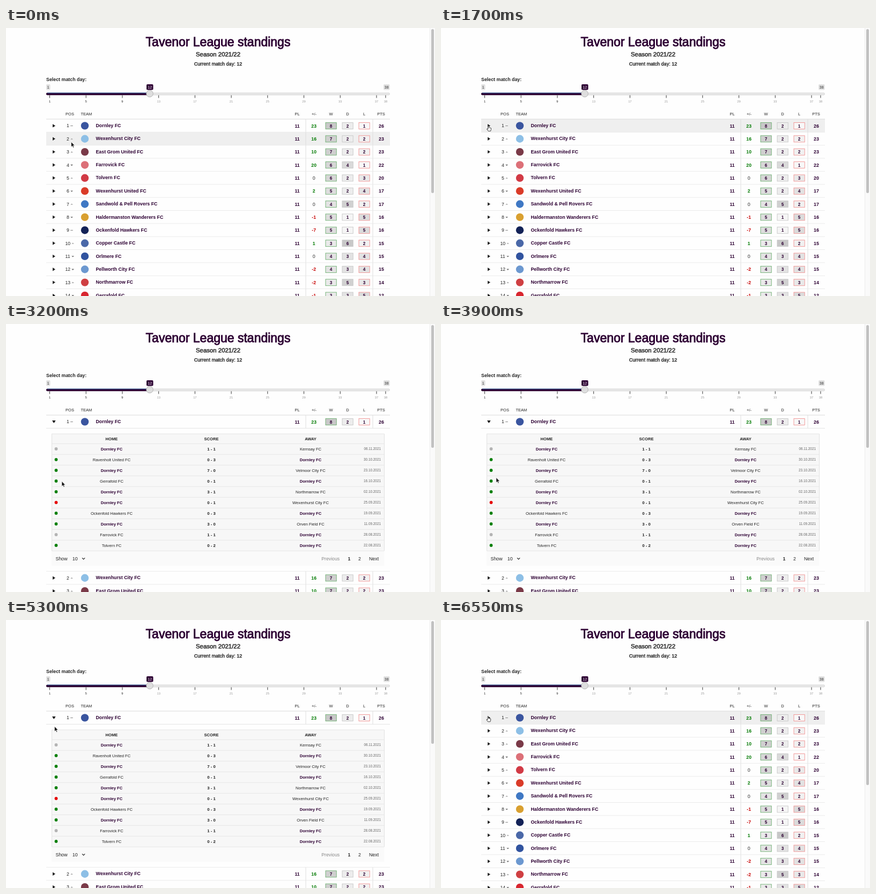
These frames come from a looping animation (800 by 500 pixels, 6600 ms). An HTML page:

```html
<!DOCTYPE html>
<html lang="en">
<head>
<meta charset="utf-8">
<title>League standings</title>
<style>
  html, body { margin: 0; width: 100%; height: 100%; overflow: hidden; background: #fefefe; }
  svg { display: block; font-family: "Liberation Sans", Arial, sans-serif; }
</style>
</head>
<body>
<svg id="stage" width="800" height="500" viewBox="0 0 800 500"></svg>
<script>
const INK = '#2d0033', DARK = '#222', LOOP = 6600, ROW = 24.35, TOP = 170, SHIFT = 267;
const OPEN_AT = 1950, CLOSE_AT = 5700;

// name, crest colour, trend, goal difference, won, drawn, lost
const teams = [
  ['Dornley FC', '#3a559f', 0, 23, 8, 2, 1],
  ['Wexenhurst City FC', '#8dbfe6', 1, 16, 7, 2, 2],
  ['East Grom United FC', '#7a3a48', 1, 10, 7, 2, 2],
  ['Farrovick FC', '#dc7078', -1, 20, 6, 4, 1],
  ['Tolvern FC', '#d23a45', 1, 0, 6, 2, 3],
  ['Wexenhurst United FC', '#da3b28', -1, 2, 5, 2, 4],
  ['Sandwold & Pell Rovers FC', '#3f78c4', 1, 0, 4, 5, 2],
  ['Haldermanston Wanderers FC', '#d9a030', -1, -1, 5, 1, 5],
  ['Ockenfold Hawkers FC', '#132257', 0, -7, 5, 1, 5],
  ['Copper Castle FC', '#4a68a8', 1, 1, 3, 6, 2],
  ['Orlmere FC', '#31539f', -1, 0, 4, 3, 4],
  ['Pellworth City FC', '#6c98d0', -1, -2, 4, 3, 4],
  ['Northmarrow FC', '#cf3f42', 1, -2, 3, 5, 3],
  ['Gerrafold FC', '#d8262f', -1, -1, 3, 3, 5]
];
// opponent, at home, score, date
const matches = [
  ['Kernsay FC', 1, '1 - 1', '06.11'],
  ['Ravenholt United FC', 0, '0 - 3', '30.10'],
  ['Velmoor City FC', 1, '7 - 0', '23.10'],
  ['Gerrafold FC', 0, '0 - 1', '16.10'],
  ['Northmarrow FC', 1, '3 - 1', '02.10'],
  ['Wexenhurst City FC', 1, '0 - 1', '25.09'],
  ['Ockenfold Hawkers FC', 0, '0 - 3', '19.09'],
  ['Orven Field FC', 1, '3 - 0', '11.09'],
  ['Farrovick FC', 0, '1 - 1', '28.08'],
  ['Tolvern FC', 0, '0 - 2', '22.08']
];

const rect = (x, y, w, h, fill, extra = '') =>
  `<rect x="${x}" y="${y}" width="${w}" height="${h}" fill="${fill}" ${extra}/>`;
const circle = (x, y, r, fill, extra = '') =>
  `<circle cx="${x}" cy="${y}" r="${r}" fill="${fill}" ${extra}/>`;
const path = (d, fill, extra = '') => `<path d="${d}" fill="${fill}" ${extra}/>`;

// y is the middle of the capitals; weight: 0 regular, 1 medium, 2 bold
function text(s, x, y, size, { fill = DARK, weight = 0, anchor = 'middle' } = {}) {
  const heavy = weight === 2 ? 'font-weight="700"'
    : weight === 1 ? `stroke="${fill}" stroke-width="${size * .04}"` : '';
  return `<text x="${x}" y="${y + size * .36}" font-size="${size}" fill="${fill}" text-anchor="${anchor}" ${heavy}>${s.toString().replace('&', '&amp;')}</text>`;
}

function header() {
  let s = text('Tavenor League standings', 395.5, 25.5, 23, { fill: INK, weight: 1 })
    + text('Season 2021/22', 395.5, 49.3, 11.4, { weight: 1 })
    + text('Current match day: 12', 395.5, 66.5, 9.05, { weight: 1 })
    + text('Select match day:', 75, 96, 8.85, { weight: 2, anchor: 'start' });
  const tag = (label, x, w, bg, fill) =>
    rect(x, 105, w, 10.5, bg, 'rx="1.8"') + text(label, x + w / 2, 110.2, 7, { fill });
  s += tag(1, 75, 7.5, '#e1e1e1', '#333') + tag(38, 704, 11.5, '#e1e1e1', '#333')
    + tag(12, 262, 12.5, INK, '#fff');
  s += rect(75.5, 121, 640, 4, '#e8e8e8', 'rx="2" stroke="#ccc" stroke-width=".7"')
    + rect(75, 120.8, 193, 4.5, '#2b0030', 'rx="2"')
    + rect(77, 120.7, 190, .8, '#428bca');
  for (const n of [1, 5, 9, 13, 17, 21, 25, 29, 33, 37, 38]) {
    const x = 81.5 + (n - 1) * 16.93;
    s += rect(x - .5, 125.5, 1, 5, '#333')
      + text(n, x, 136.5, 5.8, { fill: n < 13 ? DARK : '#999' });
  }
  s += circle(268, 122.5, 6.3, '#dedede', 'stroke="#aaa" stroke-width=".8"');
  const heads = { POS: 119, PL: 543, '+/-': 574.5, W: 606, D: 637, L: 668, PTS: 699.5 };
  for (const h in heads) s += text(h, heads[h], 160.5, 7.5);
  return s + text('TEAM', 139.5, 160.5, 7.5, { anchor: 'start' });
}

function teamRow([name, crest, trend, diff, ...wdl], i) {
  const top = TOP + ROW * i, y = top + 12.4, rank = i + 1, wide = rank > 9 ? 2.4 : 0;
  const bold = { fill: INK, weight: 2 };
  let s = rect(75, top - .5, 641, 1, i ? '#ebebeb' : '#dcdcdc')
    + rect(558.5, top, 1, ROW, '#dedede') + rect(683.5, top, 1, ROW, '#dedede');
  if (i) s += path(`M87 ${y - 3.2}l5 3.2l-5 3.2z`, DARK);
  s += text(rank, 113 - wide, y, 8.6, { anchor: 'start' });
  const m = 122.6 + wide * .85;
  s += trend ? path(`M${m - 2.3} ${y + trend + .3}h4.6l-2.3 ${-2.4 * trend}z`, trend > 0 ? '#aaa' : '#666')
    : rect(m - 2.4, y - .3, 4.6, .9, '#777');
  s += circle(147, y, 7.2, crest)
    + text(name, 167.5, y - .5, 8.8, { ...bold, anchor: 'start' })
    + text(11, 543, y, 8.7, bold)
    + text(diff, 574.2, y, 8.7, { weight: diff ? 2 : 1, fill: diff > 0 ? '#007a00' : diff ? '#c80000' : '#666' })
    + text(3 * wdl[0] + wdl[1], 700, y, 8.8, bold);
  wdl.forEach((n, k) => {
    const g = Math.round(255 - n * [6.9, 9.2, 7.2][k]), x = 606 + 31 * k;
    s += rect(x - 10, y - 5.9, 20.2, 12, `rgb(${g},${g},${g})`,
      `stroke="${['#6aae6e', '#c6c6c6', '#f29090'][k]}" stroke-width=".9"`)
      + text(n, x, y + .2, 8.2, bold);
  });
  return s;
}

function detail() {
  const line = y => rect(85, y, 620.5, 1, '#e6e6e6');
  let s = rect(75, 194, 641, 1, '#e4e4e4') + rect(85, 205, 620.5, 246, '#fafafa')
    + rect(85, 205, 620.5, 218, '#f7f7f7') + line(204.5) + line(222.8)
    + rect(85, 205, 1, 218, '#e2e2e2') + rect(705, 205, 1, 218, '#e2e2e2');
  ['HOME', 'SCORE', 'AWAY'].forEach((h, k) =>
    s += text(h, [197, 383, 568][k], 214.2, 7.6, { weight: 2 }));
  matches.forEach(([rival, home, score, date], k) => {
    const y = 233.2 + 20 * k, [a, b] = score.split(' - ');
    const result = (a - b) * (home ? 1 : -1);
    const own = { fill: INK, weight: 2 };
    s += circle(93.5, y - .2, 2.9, result > 0 ? '#0a800a' : result ? '#e60000' : '#b3b3b3')
      + text(teams[0][0], home ? 197 : 568, y, 7.6, own)
      + text(rival, home ? 568 : 197, y, 7.6)
      + text(score, 383, y, 7.8, { weight: 2 })
      + text(date + '.2021', 699, y - .3, 6.4, { fill: '#666', anchor: 'end' })
      + line(y + 9.6);
  });
  const start = { anchor: 'start' };
  return s + text('Show', 92.5, 437.6, 8.9, start) + text('10', 123.8, 437.6, 8.9, start)
    + path('M142 436.4l2.6 2.6l2.6-2.6', 'none', 'stroke="#222" stroke-width="1.2"')
    + text('Previous', 588.3, 437.6, 8.7, { ...start, fill: '#888' })
    + text(1, 639.8, 437.6, 8.7, { weight: 2 }) + text(2, 659.5, 437.6, 8.7)
    + text('Next', 677, 437.6, 8.8, start);
}

const arrow = path('M0 0V9.4L2.2 7.4L3.7 10.8L5.3 10.1L3.8 6.8H6.7Z', '#111', 'stroke="#fff" stroke-width=".7"');
const hand = path('M-.9 .8Q0-.5 .9.8V4.4L2.2 4.2L3.6 4.6L5.4 5.4V8.4L4.4 11.4H-.4L-3.2 7.6Q-3.4 6.2-2 6.6L-.9 7.6Z',
  '#fff', 'stroke="#111" stroke-width=".9" stroke-linejoin="round" transform="scale(.9)"');

const stage = document.getElementById('stage');
stage.innerHTML = rect(0, 0, 800, 500, '#fefefe')
  + rect(790, 0, 10, 500, '#fafafa') + rect(790, 0, 1, 500, '#ececec')
  + rect(793, 2, 5, 306, '#c1c1c1', 'rx="2.5" id="thumb"')
  + header()
  + rect(75, TOP, 641, ROW, '#efefef', 'id="hover"')
  + teamRow(teams[0], 0) + path('', '#111', 'id="toggle"')
  + `<g id="detail">${detail()}</g>`
  + `<g id="rest">${teams.slice(1).map((t, i) => teamRow(t, i + 1)).join('')}</g>`
  + `<g id="pointer"><g id="arrow">${arrow}</g><g id="hand">${hand}</g></g>`;

const set = (id, name, value) => document.getElementById(id).setAttribute(name, value);
const show = (id, on) => set(id, 'display', on ? 'inline' : 'none');

// time, x, y of the pointer tip
const route = [
  [0, 121.5, 212.5], [650, 93.5, 192], [750, 93.5, 192], [1500, 88.5, 182], [2200, 88.5, 182],
  [2950, 104, 293.5], [3600, 104, 293.5], [4400, 100.5, 271.5], [4700, 100.5, 271.5],
  [5550, 87.8, 179.5], [LOOP, 87.8, 179.5]
];
function pointerAt(t) {
  const k = route.findIndex(p => p[0] > t), a = route[k - 1], b = route[k];
  const u = (t - a[0]) / (b[0] - a[0]), e = u * u * (3 - 2 * u);
  return [a[1] + (b[1] - a[1]) * e, a[2] + (b[2] - a[2]) * e];
}

function draw(now) {
  const t = now % LOOP, open = t >= OPEN_AT && t < CLOSE_AT, [x, y] = pointerAt(t);
  const row = Math.floor((y - TOP) / ROW), onRow = !open || row === 0;
  show('detail', open);
  set('rest', 'transform', `translate(0 ${open ? SHIFT : 0})`);
  set('toggle', 'd', open ? 'M86 180h6.6l-3.3 5z' : 'M87 179.2l5 3.2l-5 3.2z');
  set('thumb', 'height', open ? 229 : 306);
  show('hover', onRow);
  set('hover', 'y', TOP + ROW * row);
  const clickable = onRow && x < 103;
  show('hand', clickable);
  show('arrow', !clickable);
  set('pointer', 'transform', `translate(${x} ${y})`);
  requestAnimationFrame(() => draw(performance.now()));
}
draw(0);
</script>
</body>
</html>
```
